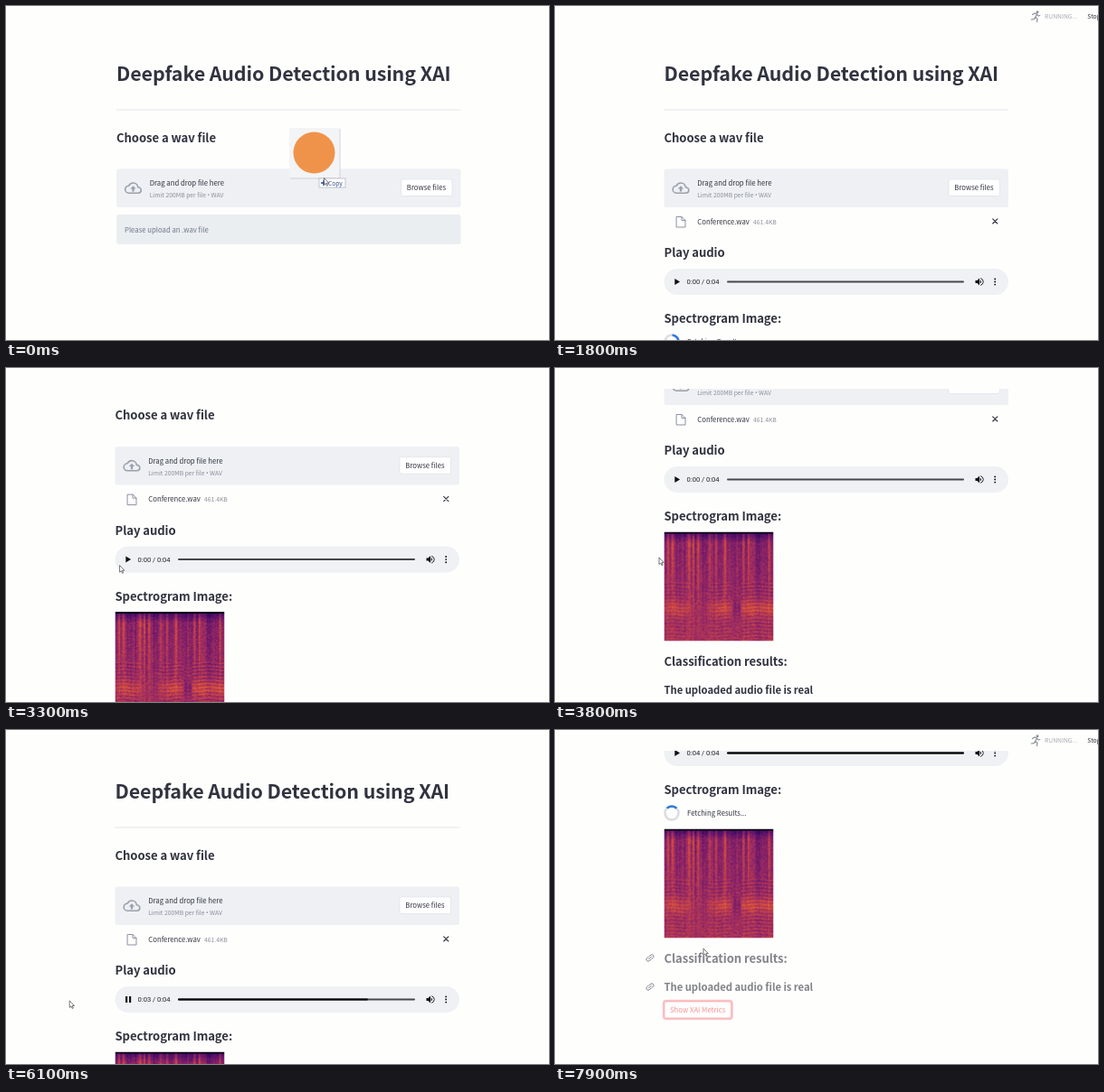
An HTML page with a canvas that plays this animation: 600x370 px, repeating every 8 s.

```html
<!DOCTYPE html>
<html lang="en">
<head>
<meta charset="utf-8">
<title>Audio detection demo</title>
<style>
  html, body { margin: 0; width: 100%; height: 100%; overflow: hidden; background: #fefefd; }
  #view { position: absolute; left: 0; top: 23px; width: 600px; height: 347px; overflow: hidden; }
  #spectrogram { position: absolute; left: 0; top: 0; width: 121px; height: 121px; }
  svg { position: absolute; left: 0; top: 0; }
  text { font-family: "Noto Sans CJK SC", "Noto Sans CJK JP", "Noto Sans CJK", Lato, sans-serif; font-size: 7.75px; fill: #31333f; white-space: pre; }
  .title, .head, .sub { font-weight: 700; letter-spacing: -.005em; }
  .title { font-size: 21.45px; }
  .head { font-size: 13.1px; }
  .sub { font-size: 11.3px; }
  .small { font-size: 6.77px; fill: #8b8e98; }
  .bullet { font-family: "Open Sans", sans-serif; }
  .clock { font-family: Roboto, sans-serif; font-size: 7.56px; fill: #222; }
</style>
</head>
<body>
<div id="view"><canvas id="spectrogram" width="121" height="121"></canvas></div>
<svg id="stage" width="600" height="370" viewBox="0 0 600 370"></svg>
<script>
const LOOP = 8000;
const DROP = 300, UPLOADED = 450, RENDERED = 850, IMAGE_READY = 1500;
const RESULT = 3200, PLAY = 5300, PLAY_END = 6300, CLICK = 7450;
const SPINNER_ROW = 26;

const SCROLL = [[2000, 0], [2600, 62], [3100, 62], [3700, 182], [4000, 182], [4650, 7],
  [6250, 7], [6900, 169], [7030, 169], [7200, 254]];
const POINTER = [[1900, 250, 225], [2600, 142, 232], [2900, 142, 232], [3600, 115, 210],
  [3900, 115, 210], [4600, 202, 274], [4750, 202, 274], [5200, 135, 297], [5450, 135, 297],
  [6200, 67, 300], [6600, 60, 300], [6950, 90, 295], [7050, 90, 295], [7300, 152, 309],
  [7480, 152, 309], [7800, 164, 242]];
const ARROW = "M0 0V7.600L1.800 6.100 3 8.700 4.100 8.200 2.900 5.600H5.300Z";

const text = (x, y, s, cls = "", extra = "") => `<text x="${x}" y="${y}" class="${cls}" ${extra}>${s}</text>`;
const line = (d, color, width = 1) =>
  `<path d="${d}" fill="none" stroke="${color}" stroke-width="${width}" stroke-linecap="round" stroke-linejoin="round"/>`;
const group = (id, body) => `<g id="${id}">${body}</g>`;
const link = (id, y) => `<g id="${id}" transform="translate(105 ${y}) rotate(-38)">` +
  line("M-.6-2H-2.600a2 2 0 0 0 0 4H-.6M.6-2H2.600a2 2 0 0 1 0 4H.6M-1.800 0H1.800", "#7e818b", .9) + "</g>";

const dropzone = `
  <rect x="120.5" y="180.5" width="380.5" height="42.5" rx="2.5" fill="#eef0f4"/>
  <g transform="translate(129.4 192) scale(.8)">
    ${line("M18.6 11A6.6 6.6 0 0 0 12 5C9.4 5 7 6.5 6 9A5 5 0 0 0 1 14a5 5 0 0 0 5 5h13a4 4 0 0 0 4-4c0-2.200-1.900-4-4.400-4z", "#9da0aa", 2)}
    <path d="M8 13h2.500v4h3v-4H16l-4-4z" fill="#9da0aa"/>
  </g>
  ${text(157.2, 199, "Drag and drop file here")}
  ${text(157.2, 212, 'Limit 200MB per file <tspan class="bullet">•</tspan> WAV', "small")}
  <rect x="435" y="192" width="56.500" height="18.500" rx="2" fill="#fff" stroke="#dfe1e6" stroke-width=".7"/>
  ${text(441.3, 204.2, "Browse files")}`;

const fileRow = `
  ${line("M134.500 233.500h5.500l4 4v7.500h-9.500zM140 233.500v4h4", "#8d91a3")}
  ${text(157.3, 241.5, "Conference.wav")}
  ${text(219, 241.5, "461.4KB", "small")}
  ${line("M483.700 235.800l5.200 5.200m0-5.200l-5.200 5.200", "#31333f", 1.1)}`;

const player = `
  <rect x="120.500" y="291" width="380.500" height="29" rx="14.500" fill="#eff1f4"/>
  <path id="playIcon" fill="#111"/>
  ${text(145.6, 308.3, "", "clock", 'id="clock"')}
  <rect x="190" y="304.500" width="262" height="2" rx="1" fill="#46474b"/>
  <rect id="played" x="190" y="304.500" width="0" height="2" rx="1" fill="#000"/>
  <path d="M464.500 304h2l2.500-2.500v8l-2.500-2.500h-2zM469.700 303.500a2.200 2.200 0 0 1 0 4z" fill="#111"/>
  ${line("M470.500 301.700a4 4 0 0 1 0 7.600", "#111", .9)}
  ${[302.4, 305.5, 308.6].map(y => `<circle cx="486.200" cy="${y}" r=".95" fill="#111"/>`).join("")}`;

const spinner = `
  <circle cx="129" cy="372" r="7.500" fill="none" stroke="#dcdde1" stroke-width="2.600"/>
  <path id="arc" d="M134.300 366.700A7.500 7.500 0 0 1 134.300 377.300" fill="none" stroke="#2f7be0" stroke-width="2.600"/>
  ${text(146, 374.8, "Fetching Results...")}`;

const results = `
  ${group("stale", `
    ${text(120.5, 511.6, "Classification results:", "head")}
    ${text(120.5, 542.6, "The uploaded audio file is real", "sub")}
    <rect id="ring" x="119.800" y="553.800" width="76" height="20.400" rx="3" fill="none" stroke="#f0485a" stroke-opacity=".5" stroke-width="2"/>
    <rect id="button" x="120.800" y="554.800" width="74" height="18.400" rx="2" fill="#fff" stroke-width=".8"/>
    ${text(127, 566.8, "Show XAI Metrics", "", 'id="buttonText"')}`)}
  ${link("linkClass", 506.5)}${link("linkFile", 538.5)}`;

const runner = `<circle cx="533" cy="6.800" r="1.500" fill="#8b8e97"/>` +
  line("M527.500 9.500l2.500-1.500 2.500 1-1.800 3.500 2.300 1.800-.5 3M530.500 12.500l-1.200 2.200-3 .3M532.500 9l1.500 2 1.800-.5", "#8b8e97", 1.2);
const swimmer = `<circle cx="534.300" cy="9" r="1.400" fill="#8b8e97"/>` +
  line("M527 6.500l3.500.500 2 3-4 1.800M525.800 13.500q1.800-1.600 3.600 0t3.600 0 3.600 0M525.800 16.200q1.800-1.600 3.600 0t3.600 0 3.600 0", "#8b8e97", 1);

document.getElementById("stage").innerHTML = `
  <clipPath id="below"><rect y="23" width="600" height="347"/></clipPath>
  <g clip-path="url(#below)"><g id="page">
    ${text(120.5, 83, "Deepfake Audio Detection using XAI", "title")}
    <rect x="120.500" y="114.500" width="380.500" height="1" fill="#e6e7e9"/>
    ${text(120.5, 150.6, "Choose a wav file", "head")}
    ${dropzone}
    ${group("info", `<rect x="120.500" y="231" width="380.500" height="33" rx="2.500" fill="#eaeef0"/>
      ${text(129.5, 250.7, "Please upload an .wav file", "", 'style="fill:#6a7688"')}`)}
    ${group("file", fileRow)}
    ${group("rendered", text(120.5, 278, "Play audio", "head") + player +
      text(120.5, 351, "Spectrogram Image:", "head"))}
    ${link("linkPlay", 273)}${link("linkImage", 345.500)}
    ${group("spinner", spinner)}
    ${group("results", results)}
  </g></g>
  ${group("running", group("runner", runner) + group("swimmer", swimmer) +
    text(541, 14, "RUNNING...", "small", 'style="fill:#a6a8b0"') +
    text(588.3, 14, "Stop", "", 'style="font-size:6.77px"'))}
  ${group("drag", `
    <rect x="314" y="136" width="56" height="56" fill="#d5d8dc" opacity=".6"/>
    <rect x="313" y="135" width="55" height="55" fill="#f3f4f5"/>
    <circle cx="340.500" cy="162.500" r="23" fill="#f0934a"/>
    <rect x="346" y="191" width="29" height="10" fill="#fff" stroke="#aeb0b8" stroke-width=".7"/>
    ${line("M348.500 196h5m-2.500-2.500v5", "#26449a", 1.3)}
    ${text(356, 198.6, "Copy", "", 'style="font-size:6.6px;fill:#3a4a8a"')}
    <path d="${ARROW}" transform="translate(351.500 190.500)" fill="#fff" stroke="#444" stroke-width=".7"/>`)}
  <path id="pointer" d="${ARROW}" fill="#fff" stroke="#555" stroke-width=".8"/>`;

const el = {};
document.querySelectorAll("[id]").forEach(node => el[node.id] = node);

// Spectrogram: noise floor, vertical speech bursts and fine low harmonics
function paintSpectrogram() {
  const size = 121, ctx = el.spectrogram.getContext("2d"), pixels = ctx.createImageData(size, size);
  const palette = [[0, 0, 4], [66, 10, 104], [147, 38, 103], [221, 81, 58], [252, 165, 10], [252, 255, 164]];
  let seed = 7;
  const random = () => (seed = seed * 16807 % 2147483647) / 2147483647;
  const bursts = [4, 9, 27, 32, 37, 50, 57, 67, 87, 93, 116];
  const columns = Array.from({ length: size }, () => random() - .5);
  for (let y = 0; y < size; y++) for (let x = 0; x < size; x++) {
    const v = y / size;
    const burst = bursts.reduce((sum, c) => sum + Math.exp(-(((x - c) / 1.3) ** 2)), 0);
    const voiced = x > 84 ? 1 : x < 76 ? .5 + .4 * Math.sin(x / 8) : -.4;
    let level = .35 + .1 * v + columns[x] * .14 * (1.2 - v) + (random() - .5) * .13;
    level += burst * .24 * Math.max(.15, 1 - v * 1.2);
    if (v > .45) level += voiced * .06 * Math.sin(y * 1.6 + Math.sin(x / 5));
    level += voiced * .12 * Math.exp(-(((v - .7) / .07) ** 2));
    level *= y < 2 ? .06 : Math.min(1, .55 + y / 26);
    const p = Math.max(0, Math.min(.999, level)) * 5, i = Math.floor(p), at = (y * size + x) * 4;
    for (let c = 0; c < 3; c++) pixels.data[at + c] = palette[i][c] + (palette[i + 1][c] - palette[i][c]) * (p - i);
    pixels.data[at + 3] = 255;
  }
  ctx.putImageData(pixels, 0, 0);
}

function track(keys, t) {
  if (t <= keys[0][0]) return keys[0].slice(1);
  const n = keys.findIndex(k => k[0] > t);
  if (n < 0) return keys[keys.length - 1].slice(1);
  const a = keys[n - 1], b = keys[n], u = (t - a[0]) / (b[0] - a[0]), ease = u * u * (3 - 2 * u);
  return a.slice(1).map((v, i) => v + (b[i + 1] - v) * ease);
}

const clamp = v => Math.max(0, Math.min(1, v));
const show = (node, on) => node.style.display = on ? "" : "none";
const move = (node, x, y) => node.setAttribute("transform", `translate(${x} ${y})`);

function render(t) {
  const clicked = t >= CLICK;
  const busy = (t >= RENDERED && t < RESULT) || clicked;
  const shift = busy ? SPINNER_ROW : 0;
  const scroll = track(SCROLL, t)[0] + (clicked ? SPINNER_ROW : 0);
  const dx = t < RENDERED ? 1.5 : 0;

  move(el.page, dx, -scroll);
  move(el.results, 0, shift);
  el.spectrogram.style.transform = `translate(120.5px, ${363.5 + shift - scroll - 23}px)`;
  show(el.spectrogram, t >= IMAGE_READY);

  show(el.info, t < RENDERED);
  move(el.info, 0, t >= UPLOADED ? 31 : 0);
  el.info.style.opacity = 1 - .6 * clamp((t - UPLOADED) / 300);
  show(el.file, t >= UPLOADED);
  show(el.rendered, t >= RENDERED);
  show(el.spinner, busy);
  show(el.results, t >= RESULT);
  el.arc.setAttribute("transform", `rotate(${45 + (t - 2900) * .405} 129 372)`);

  const progress = clamp((t - PLAY) / (PLAY_END - PLAY));
  const playing = progress > 0 && progress < 1;
  el.played.setAttribute("width", 262 * progress);
  el.clock.textContent = `0:0${Math.floor(progress * 4)} / 0:04`;
  el.playIcon.setAttribute("d", playing ? "M132 302h2.200v7H132zm4 0h2.200v7H136z" : "M132.300 302v7l5.800-3.500z");

  el.stale.style.opacity = 1 - .4 * clamp((t - CLICK) / 300);
  const hot = t >= 7250;
  show(el.ring, clicked);
  el.button.setAttribute("stroke", hot ? "#ff4b4b" : "#d5d7dc");
  el.buttonText.style.fill = hot ? "#ff4b4b" : "";

  show(el.linkPlay, t >= 4500 && t < 5000);
  show(el.linkImage, t >= 4350 && t < 4800);
  show(el.linkClass, t >= 7700);
  show(el.linkFile, t >= 7600);

  show(el.running, (t >= UPLOADED && t < 3300) || clicked);
  const swims = Math.floor(t / 300) % 2 === 1;
  show(el.runner, !swims);
  show(el.swimmer, swims);

  show(el.drag, t < DROP);
  move(el.drag, -t / 60, t / 60);
  show(el.pointer, t >= 1900);
  move(el.pointer, ...track(POINTER, t));
}

paintSpectrogram();
const start = performance.now();
function frame() {
  render((performance.now() - start) % LOOP);
  requestAnimationFrame(frame);
}
frame();
</script>
</body>
</html>
```
